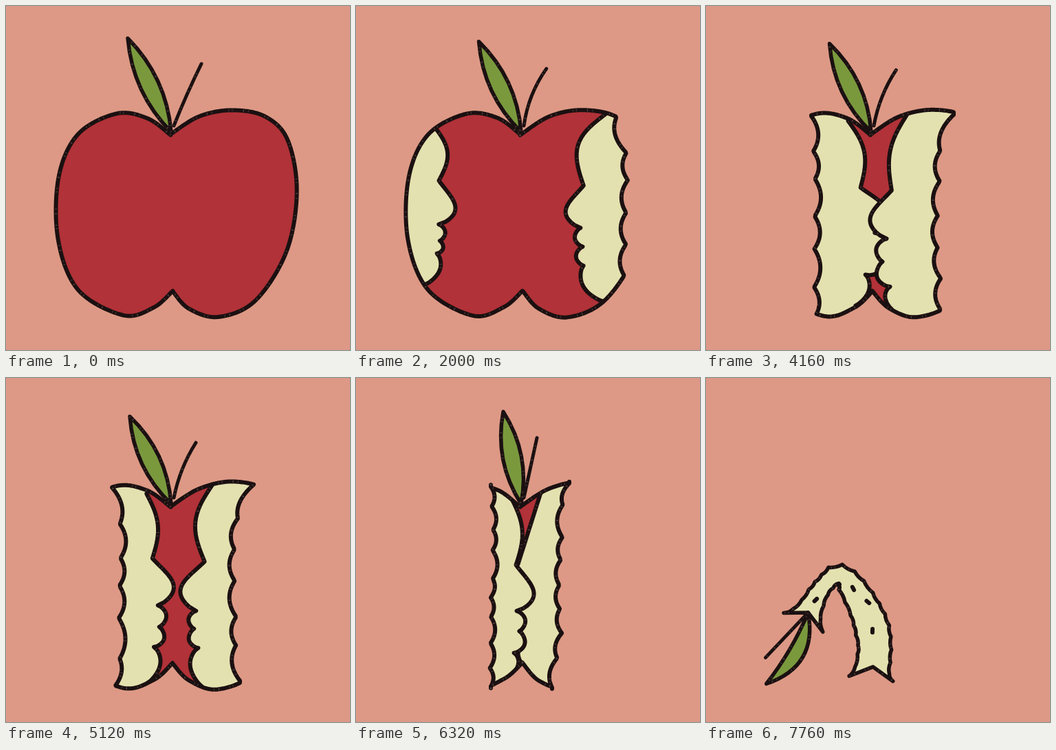
Animation of 500x500 px, one loop 7840 ms. Source, as an HTML page with a canvas:

```html
<!DOCTYPE html>
<html lang="en">
<head>
<meta charset="utf-8">
<title>Apple</title>
<style>
  html, body { margin: 0; width: 100%; height: 100%; overflow: hidden; background: #dd9985; }
  canvas { display: block; width: 500px; height: 500px; }
</style>
</head>
<body>
<canvas id="stage" width="500" height="500"></canvas>
<script>
const ctx = document.getElementById('stage').getContext('2d');
const LOOP = 7840, STEP = 80, FALL = 6400, REST = 7200;
const SKIN = '#b13238', FLESH = '#e4e1b0', LEAF = '#7a993d', INK = '#1b1011', PAPER = '#dd9985';
let frame = 0;

const lerp = (a, b, u) => a + (b - a) * u;
const clamp = u => Math.max(0, Math.min(1, u));
const smooth = u => u * u * (3 - 2 * u);
const mix = (a, b, u) => a.map((v, i) => lerp(v, b[i], u));

function pairs(a) {
  const out = [];
  for (let i = 0; i < a.length; i += 2) out.push([a[i], a[i + 1]]);
  return out;
}

function rnd(n) {
  const s = Math.sin(n * 127.1 + 11.7) * 43758.5453;
  return s - Math.floor(s);
}

// hand-drawn boil: every drawing is slightly different
const boil = (pts, seed) => pts.map(([x, y], i) => [
  x + (rnd(frame * 31 + i * 3 + seed) - 0.5) * 1.3,
  y + (rnd(frame * 17 + i * 5 + seed + 9) - 0.5) * 1.3
]);

function track(keys, t) {
  const k = keys.findIndex(key => key[0] >= t);
  if (k < 0) return keys[keys.length - 1][1];
  if (k === 0) return keys[0][1];
  const [t0, a] = keys[k - 1], [t1, b] = keys[k];
  return mix(a, b, (t - t0) / (t1 - t0));
}

function catmull(a, b, c, d, u) {
  const cubic = 3 * (b - c) + d - a;
  const square = 2 * a - 5 * b + 4 * c - d;
  return b + 0.5 * u * (c - a + u * (square + u * cubic));
}

function spline(pts, n) {
  const out = [pts[0]], last = pts.length - 1;
  for (let i = 0; i < last; i++) {
    const a = pts[Math.max(0, i - 1)], d = pts[Math.min(last, i + 2)];
    for (let k = 1; k <= n; k++) {
      out.push([0, 1].map(j => catmull(a[j], pts[i][j], pts[i + 1][j], d[j], k / n)));
    }
  }
  return out;
}

// point beside the line a-b, at fraction u, offset sideways by px
function beside(a, b, u, px) {
  const dx = b[0] - a[0], dy = b[1] - a[1], len = Math.hypot(dx, dy) || 1;
  return [a[0] + dx * u - dy / len * px, a[1] + dy * u + dx / len * px];
}

function trace(pts, close) {
  const p = new Path2D();
  pts.forEach(([x, y], i) => i ? p.lineTo(x, y) : p.moveTo(x, y));
  if (close) p.closePath();
  return p;
}

function fill(path, color) {
  ctx.fillStyle = color;
  ctx.fill(path);
}

// dark crayon line with a few paler grains
function ink(path, width) {
  ctx.strokeStyle = INK;
  ctx.lineWidth = width;
  ctx.stroke(path);
  ctx.save();
  ctx.lineCap = 'butt';
  ctx.strokeStyle = 'rgba(205,165,150,.3)';
  ctx.lineWidth = width * 0.55;
  ctx.setLineDash([1, 6, 1.5, 15, 1, 4, 1, 24]);
  ctx.lineDashOffset = frame * 17;
  ctx.stroke(path);
  ctx.restore();
}

// ---- apple outline, eaten from both sides ----
const leftHalf = pairs([239,187, 205,163, 160,157, 104,187, 76,250, 76,340, 105,413, 170,450, 215,438, 242,414]);
const rightHalf = pairs([242,414, 266,440, 308,452, 362,428, 407,357, 423,270, 410,195, 377,161, 328,151, 280,161, 239,187]);

// n bites between two ends, pulled towards the waist
function bites(x0, y0, waist, x1, y1, n) {
  return Array.from({ length: n + 1 }, (_, k) => {
    const u = k / n, inner = k > 0 && k < n ? 1 : 0;
    const x = lerp(waist, lerp(x0, x1, u), (2 * u - 1) ** 4);
    return [x + inner * (rnd(k + waist) - 0.5) * 5, lerp(y0, y1, u) + inner * (rnd(k * 7 + waist) - 0.5) * 12];
  });
}

const thinL = bites(122, 172, 123, 110, 415, 5), thinR = bites(375, 164, 365, 358, 432, 5);
const coreL = bites(153, 160, 158, 158, 452, 6), coreR = bites(360, 158, 339, 340, 440, 6);
// start, end, bite corners, sideways shift; eaten from top to bottom
const eatL = [
  [2080, 2400, thinL, -22], [2480, 3040, thinL, 0],
  [3040, 3200, coreL, -22], [3280, 4000, coreL, -12], [4000, 4160, coreL, 0],
  [4320, 4880, bites(153, 158, 166, 154, 453, 6), 0], [5280, 6240, bites(196, 158, 197, 196, 448, 9), 0]
];
const eatR = [
  [1600, 1960, bites(378, 163, 393, 390, 392, 5), 0], [2480, 3040, thinR, 0], [3040, 3200, coreR, 0],
  [4320, 4880, bites(360, 155, 334, 340, 440, 6), 0], [5280, 6240, bites(310, 153, 298, 285, 450, 8), 0]
];

function biteX(y, c, dir) {
  if (y <= c[0][1]) return c[0][0];
  const k = c.findIndex(p => p[1] > y);
  if (k < 0) return c[c.length - 1][0];
  const [x0, y0] = c[k - 1], [x1, y1] = c[k], u = (y - y0) / (y1 - y0);
  return lerp(x0, x1, u) + dir * Math.min(9, (y1 - y0) * 0.17) * 4 * u * (1 - u);
}

function edgeX(y, t, eaten, dir) {
  let x = -dir * 1e4;
  for (const [t0, t1, corners, dx] of eaten) {
    if (t <= t0) break;
    const reach = t >= t1 ? 1e4 : lerp(150, 455, (t - t0) / (t1 - t0));
    const next = corners.find(p => p[1] > y);
    if ((next ? next[1] : 460) <= reach) x = biteX(y, corners, dir) + dx;
  }
  return x;
}

function silhouette(t) {
  const l = spline(boil(leftHalf, 1), 30).map(([x, y]) => [Math.max(x, edgeX(y, t, eatL, 1)), y]);
  const r = spline(boil(rightHalf, 2), 30).map(([x, y]) => [Math.min(x, edgeX(y, t, eatR, -1)), y]);
  return trace(l.concat(r), true);
}

// ---- profiles: forehead bulge, then hairline, brow, nose base, mouth, chin, neck ----
const farL = [0.2, 115,177, 121,254, 121,317, 122,341, 118,360, 102,404];
const farR = [0.23, 362,157, 331,261, 326,323, 329,350, 331,377, 360,430];
const away = (f, dx) => f.map((v, i) => i % 2 ? v + dx : v);
const playL = [
  [880, away(farL, -82)], [2000, farL],
  [3040, [0.15, 190,162, 205,257, 215,324, 222,360, 218,391, 205,444]],
  [3840, [0.15, 207,167, 224,264, 246,330, 256,358, 232,391, 218,435]],
  [4240, [0.15, 207,167, 224,264, 246,330, 256,358, 232,391, 218,435]],
  [5040, [0.13, 205,168, 213,262, 221,330, 223,362, 215,391, 206,443]],
  [5280, [0.13, 205,168, 213,262, 221,330, 223,362, 215,391, 206,443]],
  [6000, [0.13, 225,174, 232,272, 233,338, 237,368, 230,400, 228,430]]
];
const playR = [
  [880, away(farR, 128)], [2000, farR],
  [3040, [0.2, 322,153, 288,266, 275,336, 269,365, 272,401, 280,446]],
  [3840, [0.12, 292,158, 270,268, 262,338, 256,371, 267,408, 270,440]],
  [4240, [0.12, 292,158, 270,268, 262,338, 256,371, 267,408, 270,440]],
  [5040, [0.17, 300,156, 289,267, 276,338, 273,365, 279,393, 284,448]],
  [5280, [0.17, 300,156, 289,267, 276,338, 273,365, 279,393, 284,448]],
  [6000, [0, 268,167, 236,270, 226,338, 230,368, 243,384, 249,424]]
];

// bulge, skew and roundness of nose, lips and chin
const FEATURES = [[0.38, 1.5, 0.7], [0.36, 1, 0.7], [0.37, 1, 0.7], [0.25, 0.85, 0.8]];

function profile([brow, ...xy], dir) {
  const pts = boil(pairs(xy), dir + 5), line = [pts[0]], n = 18;
  [[brow, 1, 1], ...FEATURES].forEach(([bulge, skew, round], i) => {
    const a = pts[i], b = pts[i + 1], size = bulge * Math.hypot(b[0] - a[0], b[1] - a[1]);
    for (let k = 1; k <= n; k++) {
      const u = k / n, rise = Math.max(0, Math.sin(Math.PI * u ** skew)) ** round;
      line.push(beside(a, b, u, -dir * size * rise));
    }
  });
  return line;
}

function face(keys, t, dir) {
  const line = profile(track(keys, t), dir), side = 250 - dir * 300;
  const a = line[0], b = line[line.length - 1];
  fill(trace([[a[0], 80], ...line, [b[0], 500], [side, 500], [side, 80]], true), FLESH);
  ink(trace(line), 6);
}

function apple(t) {
  const body = silhouette(t), cast = [[playL, 1], [playR, -1]];
  if (t > 5400) cast.reverse();
  fill(body, SKIN);
  ctx.save();
  ctx.clip(body);
  cast.forEach(([keys, dir]) => face(keys, t, dir));
  ctx.restore();
  ink(body, 6);
}

// ---- leaf and stem ----
// leaf tip, stem tip, stem bow
const sway = [
  [0, [177,47, 284,84, -2]], [800, [178,50, 277,90, -12]],
  [5120, [180,56, 276,94, -8]], [6080, [214,49, 263,87, 0]]
];

function sprig(base, root, tip, stemTip, bow, bulges) {
  const stem = new Path2D();
  stem.moveTo(...root);
  stem.quadraticCurveTo(...beside(root, stemTip, 0.5, bow), ...stemTip);
  ink(stem, 5);
  const leaf = new Path2D();
  leaf.moveTo(...base);
  leaf.quadraticCurveTo(...beside(base, tip, 0.5, bulges[0]), ...tip);
  leaf.quadraticCurveTo(...beside(base, tip, 0.5, bulges[1]), ...base);
  leaf.closePath();
  fill(leaf, LEAF);
  ink(leaf, 5.5);
}

function standingSprig(t) {
  const [x, y, sx, sy, bow] = track(sway, t);
  sprig([240, 183], [244, 174], [x, y], [sx, sy], bow, [-27, 27]);
}

// ---- the gnawed core sinking to the ground ----
const archSpine = pairs([240,437, 245,385, 230,335, 196,286, 166,308, 142,355]);
const seeds = [[0.86, -2, 0.8], [0.5, 0, -1.1], [0.42, 9, -0.7], [0.27, 0, -1.6]];

// higher points swing further out to the left on their way down
function sink(a, b, u) {
  const h = Math.max(0, (430 - a[1]) / 280);
  const c = [(a[0] + b[0]) / 2 - 135 * h * h, (a[1] + b[1]) / 2 - 80 * h];
  return mix(mix(a, c, u), mix(c, b, u), u);
}

function nibble(path, pts) {
  path.lineTo(...pts[0]);
  for (let k = 1; k < pts.length; k++) {
    path.quadraticCurveTo(...beside(pts[k - 1], pts[k], 0.5, -3), ...pts[k]);
  }
}

function core(t) {
  const u = smooth(clamp((t - FALL) / (REST - FALL))), late = t - REST;
  const last = archSpine.length - 1;
  const spine = spline(archSpine.map((p, i) => sink(mix([241, 448], [248, 155], i / last), p, u)), 10);
  const off = (s, px) => {
    const i = Math.min(spine.length - 2, Math.floor(s * (spine.length - 1)));
    return beside(spine[i], spine[i + 1], s * (spine.length - 1) - i, px);
  };
  const width = s => lerp(86, 38 + 12 * Math.sin(2 * Math.PI * s), u) + lerp(12, 25, u) * (2 * s - 1) ** 8;
  const side = (n, dir) => boil(Array.from({ length: n + 1 }, (_, k) => off(k / n, dir * width(k / n) / 2)), dir + 3);

  const p = new Path2D(), crown = off(0.93, 0);
  p.moveTo(...off(0.08, 0));
  nibble(p, side(18, 1));
  p.lineTo(...crown);
  nibble(p, side(15, -1).reverse());
  p.closePath();
  fill(p, FLESH);
  ink(p, 5.5);

  for (const [s, px, turn] of seeds) {
    const [x, y] = off(s, px), dx = Math.cos(turn) * 2.5, dy = -Math.sin(turn) * 2.5;
    ink(trace([[x - dx, y - dy], [x + dx, y + dy]]), 6);
  }

  const swing = late < 0 ? u ** 4 : Math.cos(late / 90) * Math.exp(-late / 170);
  const polar = (from, to, len) => {
    const a = (lerp(from, to, u) + 11 * swing) * Math.PI / 180;
    return [crown[0] + Math.cos(a) * len, crown[1] + Math.sin(a) * len];
  };
  const bulges = mix([-27, 22], [-52, -8], u);
  sprig(crown, mix([crown[0] + 4, crown[1] - 8], crown, u), polar(-102, -240, lerp(136, 120, u)),
    polar(-77, -227, 90), 0, bulges);
}

function draw(now) {
  const t = Math.floor((now % LOOP) / STEP) * STEP;
  frame = t / STEP;
  ctx.fillStyle = PAPER;
  ctx.fillRect(0, 0, 500, 500);
  ctx.lineCap = ctx.lineJoin = 'round';
  if (t > FALL) {
    core(t);
  } else {
    apple(t);
    standingSprig(t);
  }
}

const start = performance.now();
function tick() {
  draw(Math.max(0, performance.now() - start));
  requestAnimationFrame(tick);
}
tick();
</script>
</body>
</html>
```
